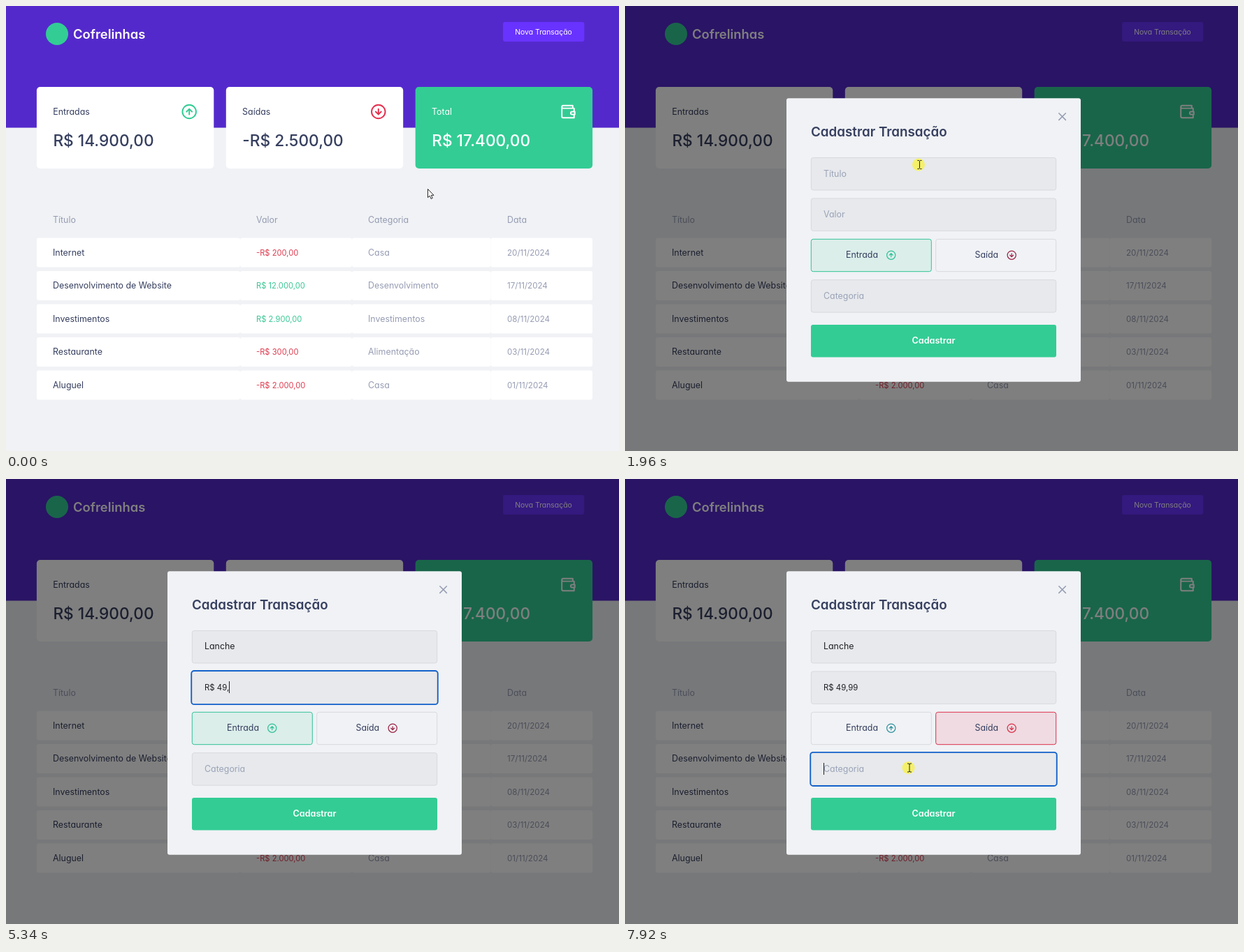
Animation of 877 by 638 pixels, one loop 8 s. Source, as an HTML page:

```html
<!DOCTYPE html>
<html lang="pt-BR">
<head>
<meta charset="utf-8">
<title>Transações</title>
<style>
  html, body { margin: 0; height: 100%; overflow: hidden; background: #f0f2f5; }
  svg { display: block; font-family: Inter, "Open Sans", sans-serif; font-feature-settings: "cv11"; }
</style>
</head>
<body>
<svg id="stage" width="877" height="638" viewBox="0 0 877 638"></svg>
<script>
const INK = '#363f5f', GRAY = '#969cb3', GREEN = '#33cc95', RED = '#e52e4d', PAPER = '#f0f2f5';
const LABEL = 12.4;
const stage = document.getElementById('stage');
const $ = id => document.getElementById(id);

const rect = (x, y, w, h, fill, r = 0, more = '') =>
  `<rect x="${x}" y="${y}" width="${w}" height="${h}" rx="${r}" fill="${fill}" ${more}/>`;
const text = (x, y, s, size, fill, more = '') =>
  `<text x="${x}" y="${y}" font-size="${size}" fill="${fill}" ${more}>${s}</text>`;
const arrowIcon = (x, y, scale, up, color, id = '') =>
  `<g id="${id}" transform="translate(${x} ${y}) scale(${scale} ${up ? scale : -scale})" fill="none"
    stroke="${color}" stroke-width="2" stroke-linecap="round" stroke-linejoin="round">
    <circle r="10"/><path d="M0 4V-4M-4 0L0 -4L4 0"/></g>`;

const card = (x, label, value, fill, c1, c2) => rect(x, 116, 253.4, 117, fill, 5) +
  text(x + 23.3, 155.7, label, LABEL, c1) +
  text(x + 23.5, 201, value, 22.7, c2, 'font-weight="500"');

const columns = [43.9, 335, 495, 693.5, 839.1];
const rows = [
  ['Internet', '-R$ 200,00', 'Casa', '20/11/2024'],
  ['Desenvolvimento de Website', 'R$ 12.000,00', 'Desenvolvimento', '17/11/2024'],
  ['Investimentos', 'R$ 2.900,00', 'Investimentos', '08/11/2024'],
  ['Restaurante', '-R$ 300,00', 'Alimentação', '03/11/2024'],
  ['Aluguel', '-R$ 2.000,00', 'Casa', '01/11/2024']
];
const row = (cells, i) => {
  const y = 332.5 + i * 47.5, valueColor = cells[1][0] === '-' ? '#de3c50' : '#39c894';
  const boxes = cells.map((_, c) => rect(columns[c], y, columns[c + 1] - columns[c], 42, '#fff', 3));
  return boxes.join('') +
    text(67, y + 25.2, cells[0], LABEL, INK) +
    text(358, y + 25, cells[1], 11.2, valueColor) +
    text(518, y + 25.2, cells[2], LABEL, GRAY) +
    text(717, y + 25, cells[3], 11.6, GRAY);
};
const heads = [[67, 'Título'], [358, 'Valor'], [518, 'Categoria'], [717, 'Data']];

const fields = [[217.5, 'Título', LABEL], [275.9, 'Valor', 11.4], [392.7, 'Categoria', LABEL]];
const field = ([y, label, size], i) =>
  rect(266.3, y, 350.4, 46.4, '#e7e9ec', 3, 'stroke="#d7d9dd"') +
  text(284, y + 27, label, LABEL, '#9aa3b7', `id="hint${i}"`) +
  text(284, y + 26.8, '', size, '#1f2024', `id="typed${i}"`);

stage.innerHTML =
  rect(0, 0, 877, 638, PAPER) + rect(0, 0, 877, 174.5, '#5429cc') +
  `<circle cx="73" cy="40" r="16" fill="${GREEN}"/>` +
  text(96, 46.7, 'Cofrelinhas', 18.4, '#fff', 'font-weight="600"') +
  '<g id="button">' + rect(711.1, 23, 116.2, 28, '#6933ff', 3) +
  rect(711.5, 23.4, 115.4, 27.2, 'none', 3, 'id="edge" stroke="#fff" stroke-width=".8"') +
  text(769, 40.6, 'Nova Transação', 10.4, '#fff', 'text-anchor="middle"') + '</g>' +
  card(43.9, 'Entradas', 'R$ 14.900,00', '#fff', INK, INK) +
  card(314.8, 'Saídas', '-R$ 2.500,00', '#fff', INK, INK) +
  card(585.7, 'Total', 'R$ 17.400,00', GREEN, '#fff', '#fff') +
  arrowIcon(262.2, 151.5, .975, true, GREEN) + arrowIcon(532.8, 151.5, .975, false, RED) +
  `<g transform="translate(792.3 139.8) scale(.975)" fill="none" stroke="#fff" stroke-width="2"
    stroke-linecap="round" stroke-linejoin="round">
    <path d="M21 12V7H5a2 2 0 0 1 0-4h14v4M3 5v14a2 2 0 0 0 2 2h16v-5M18 12a2 2 0 0 0 0 4h4v-4z"/></g>` +
  heads.map(([x, s]) => text(x, 310.8, s, LABEL, GRAY)).join('') +
  rows.map(row).join('') +
  '<g id="modal">' + rect(0, 0, 877, 638, '#000', 0, 'opacity=".5"') +
  rect(231, 132.3, 421, 406.4, PAPER, 3) +
  `<path d="M620.8 153.8l9.6 9.6m0-9.6l-9.6 9.6" stroke="${GRAY}" stroke-width="1.5" stroke-linecap="round"/>` +
  text(266, 186.5, 'Cadastrar Transação', 18.8, INK, 'font-weight="600"') +
  fields.map(field).join('') +
  rect(266.3, 334.3, 172, 46.4, '', 3, 'id="income"') + text(316, 361.2, 'Entrada', LABEL, INK) +
  rect(444.7, 334.3, 172, 46.4, '', 3, 'id="expense"') + text(500.5, 361.2, 'Saída', LABEL, INK) +
  arrowIcon(380.7, 357.2, .61, true, GREEN, 'incomeIcon') +
  arrowIcon(553.2, 357.2, .61, false, RED, 'expenseIcon') +
  rect(266, 457, 351, 46.5, GREEN, 3) +
  text(441.5, 484, 'Cadastrar', 12.6, '#fff', 'font-weight="600" text-anchor="middle"') +
  rect(265.2, 0, 352.6, 48.2, 'none', 4, 'id="ring" stroke="#1262cc" stroke-width="1.8"') +
  rect(284, 0, 1, 17, '#1f2024', 0, 'id="caret"') + '</g>' +
  `<circle id="glow" r="9" fill="#fff500" opacity=".55"/>
  <g id="cursor" stroke-linejoin="round">
    <path id="arrow" d="M.5 .5V12.6L3.2 10.1L5.1 14.4L7.2 13.4L5.3 9.3H9z" fill="#fff" stroke="#111" stroke-width=".9"/>
    <path id="hand" d="M-1.2 1.2Q0-.6 1.2 1.2V6L5 6.8Q7 7.4 7 9.4L6 13V16H-.8V14L-4.2 10Q-4.6 8.2-2.8 8.6L-1.2 10z" fill="#fff" stroke="#111" stroke-width=".9"/>
    <path id="beam" d="M-3-6H-1L0-5.2L1-6H3M-3 6H-1L0 5.2L1 6H3M0-5V5" fill="none" stroke="#222"/>
  </g>`;

const show = (id, on) => $(id).setAttribute('visibility', on ? 'inherit' : 'hidden');
const attrs = (id, o) => { for (const k in o) $(id).setAttribute(k, o[k]); };
const within = (t, spans) => spans.some(([a, b]) => t >= a && t < b);
const latest = (t, steps) => steps.reduce((v, [at, s]) => t >= at ? s : v, '');

const OPEN = 1250, PICK = 7230;
const path = [[520, 603, 262], [1120, 728, 40], [1330, 728, 40], [1960, 419, 229],
  [6640, 419, 229], [7180, 470, 358], [7430, 470, 358], [7860, 407, 414]];
const typing = [
  [[2810, 'L'], [3070, 'La'], [3270, 'Lan'], [3470, 'Lanc'], [3540, 'Lanch'], [3740, 'Lanche']],
  [[5000, 'R$ 4'], [5070, 'R$ 49'], [5340, 'R$ 49,'], [5610, 'R$ 49,9'], [5810, 'R$ 49,99']],
  []
];
const focus = [[2030, 4200], [4200, PICK], [7920, 8000]];
const caretOn = [[2030, 2550], [2810, 4200], [4270, 4800], [5000, 5880], [6410, 6940], [7920, 8000]];
const clicks = [[1120, OPEN], [1960, 2100], [PICK, 7400], [7860, 8000]];

// The pointer moves in ticks of about 15 per second.
function pointer(t) {
  const q = t < 520 ? t : 520 + Math.floor((t - 520) / 67) * 67;
  const i = path.findIndex(p => p[0] > q);
  if (i === 0) return path[0].slice(1);
  if (i < 0) return path[path.length - 1].slice(1);
  const [a, x, y] = path[i - 1], [b, u, v] = path[i];
  const p = (q - a) / (b - a), e = p * p * (3 - 2 * p);
  return [x + (u - x) * e, y + (v - y) * e];
}

function shape(x, y, open) {
  if (!open) return x > 711 && x < 827 && y > 23 && y < 51 ? 'hand' : 'arrow';
  if (x < 266 || x > 617) return 'arrow';
  if (fields.some(([top]) => y > top && y < top + 47)) return 'beam';
  return y > 334 && y < 381 && (x < 438 || x > 444) ? 'hand' : 'arrow';
}

function choice(id, on, color, tint, idle) {
  attrs(id, { fill: on ? tint : PAPER, stroke: on ? color : '#d7d9dd' });
  attrs(id + 'Icon', { stroke: on ? color : idle });
}

function draw(t) {
  const open = t >= OPEN;
  show('modal', open);
  show('edge', t >= 1120 && !open);
  const light = open ? Math.min(1, .87 + .13 * (t - OPEN) / 140) : 1;
  $('button').style.filter = light < 1 ? `brightness(${light})` : 'none';

  choice('income', t < PICK, '#2fc196', '#dbeeea', '#2f919c');
  choice('expense', t >= PICK, '#dc2e4a', '#efdbe1', '#9b2042');

  fields.forEach((_, i) => {
    const s = latest(t, typing[i]);
    $('typed' + i).textContent = s;
    show('hint' + i, !s);
  });
  const active = focus.findIndex(span => within(t, [span]));
  show('ring', active >= 0);
  show('caret', active >= 0 && within(t, caretOn));
  if (active >= 0) {
    const y = fields[active][0], typed = $('typed' + active);
    attrs('ring', { y: y - .9 });
    attrs('caret', { x: 284 + Math.round(typed.textContent ? typed.getComputedTextLength() : 0), y: Math.round(y + 14.5) });
  }

  const [x, y] = pointer(t), kind = shape(x, y, open);
  show('cursor', t < 2810 || t >= 6670);
  attrs('cursor', { transform: `translate(${x} ${y})` });
  for (const k of ['arrow', 'hand', 'beam']) show(k, k === kind);
  show('glow', within(t, clicks));
  attrs('glow', { cx: x - 1.5, cy: y });
}

let start;
function loop(now) {
  start ??= now;
  draw((now - start) % 8000);
  requestAnimationFrame(loop);
}
draw(0);
requestAnimationFrame(loop);
</script>
</body>
</html>
```
